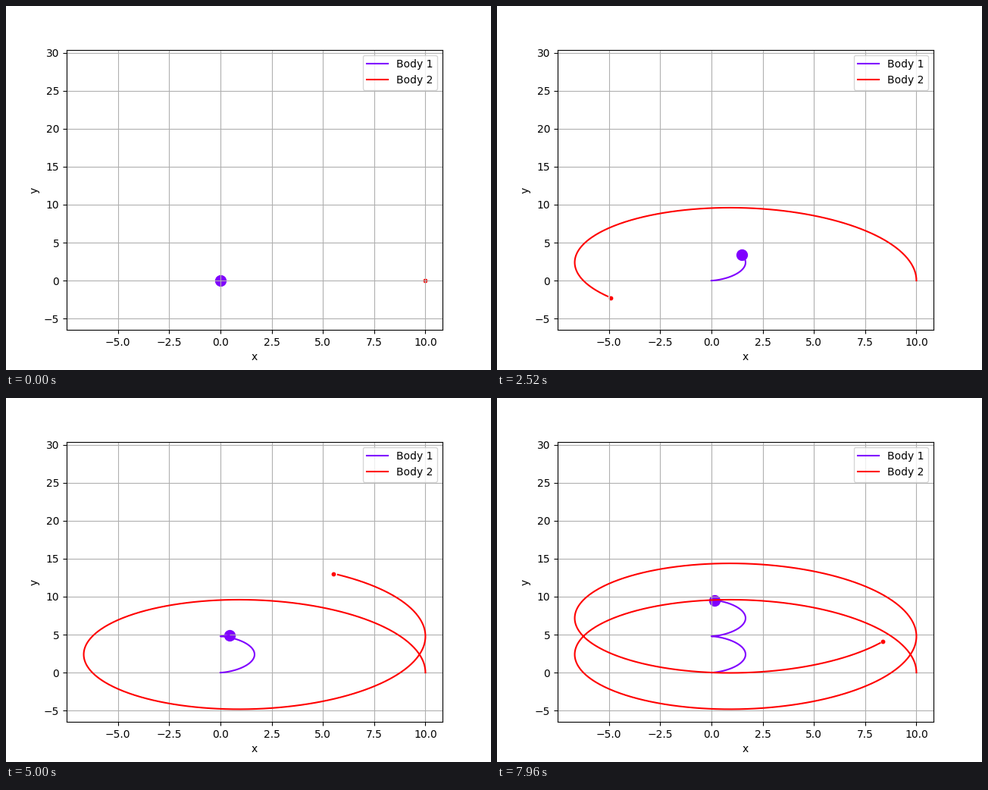
Write a matplotlib script that moves like this. It is 640 px wide and 480 px high and loops after 8 s.

```python
import numpy as np
import matplotlib.pyplot as plt
from matplotlib.animation import FuncAnimation

MASSES = (10.0, 1.0)
DIST = 10.0           # starting separation, also the apoapsis
DT = 0.125            # time between samples
STEPS = 4             # samples per frame
FRAMES = 200
T_END = 250.0


def solve_orbit(t):
    """Positions of both bodies; body 1 starts at rest, body 2 moves up."""
    m1, m2 = MASSES
    total = m1 + m2
    speed = np.sqrt(m1 / DIST)
    ecc = 1 - DIST * speed**2 / total
    a = DIST / (1 + ecc)
    b = a * np.sqrt(1 - ecc**2)
    mean = np.sqrt(total / a**3) * t

    # Kepler's equation, with the angle counted from apoapsis
    ang = mean.copy()
    for _ in range(8):
        ang -= (ang + ecc * np.sin(ang) - mean) / (1 + ecc * np.cos(ang))

    rel = np.array([a * (np.cos(ang) + ecc), b * np.sin(ang)])
    centre = np.array([np.full_like(t, DIST * m2 / total),
                       speed * m2 / total * t])
    return centre - rel * m2 / total, centre + rel * m1 / total


def padded(values, margin=0.05):
    lo, hi = values.min(), values.max()
    pad = margin * (hi - lo)
    return lo - pad, hi + pad


paths = solve_orbit(np.arange(0, T_END + DT, DT))
colors = plt.cm.rainbow(np.linspace(0, 1, len(paths)))

fig, ax = plt.subplots(figsize=(6.4, 4.8), dpi=100)
everything = np.hstack(paths)
ax.set_xlim(*padded(everything[0]))
ax.set_ylim(*padded(everything[1]))
ax.set_xlabel("x")
ax.set_ylabel("y")
ax.grid(True)

trails, dots = [], []
for n, (mass, color) in enumerate(zip(MASSES, colors), 1):
    trails.append(ax.plot([], [], color=color, label=f"Body {n}")[0])
    dots.append(ax.scatter([0], [0], s=10 * mass, color=[color]))
ax.legend(loc="upper right")


def update(frame):
    now = max(STEPS * frame - 1, 0)
    for path, trail, dot in zip(paths, trails, dots):
        trail.set_data(*path[:, :max(now - 1, 0)])
        dot.set_offsets(path[:, now])
    return trails + dots


anim = FuncAnimation(fig, update, frames=FRAMES, interval=40,
                     init_func=lambda: update(0), repeat=True,
                     repeat_delay=0, blit=False)
plt.show()
```
